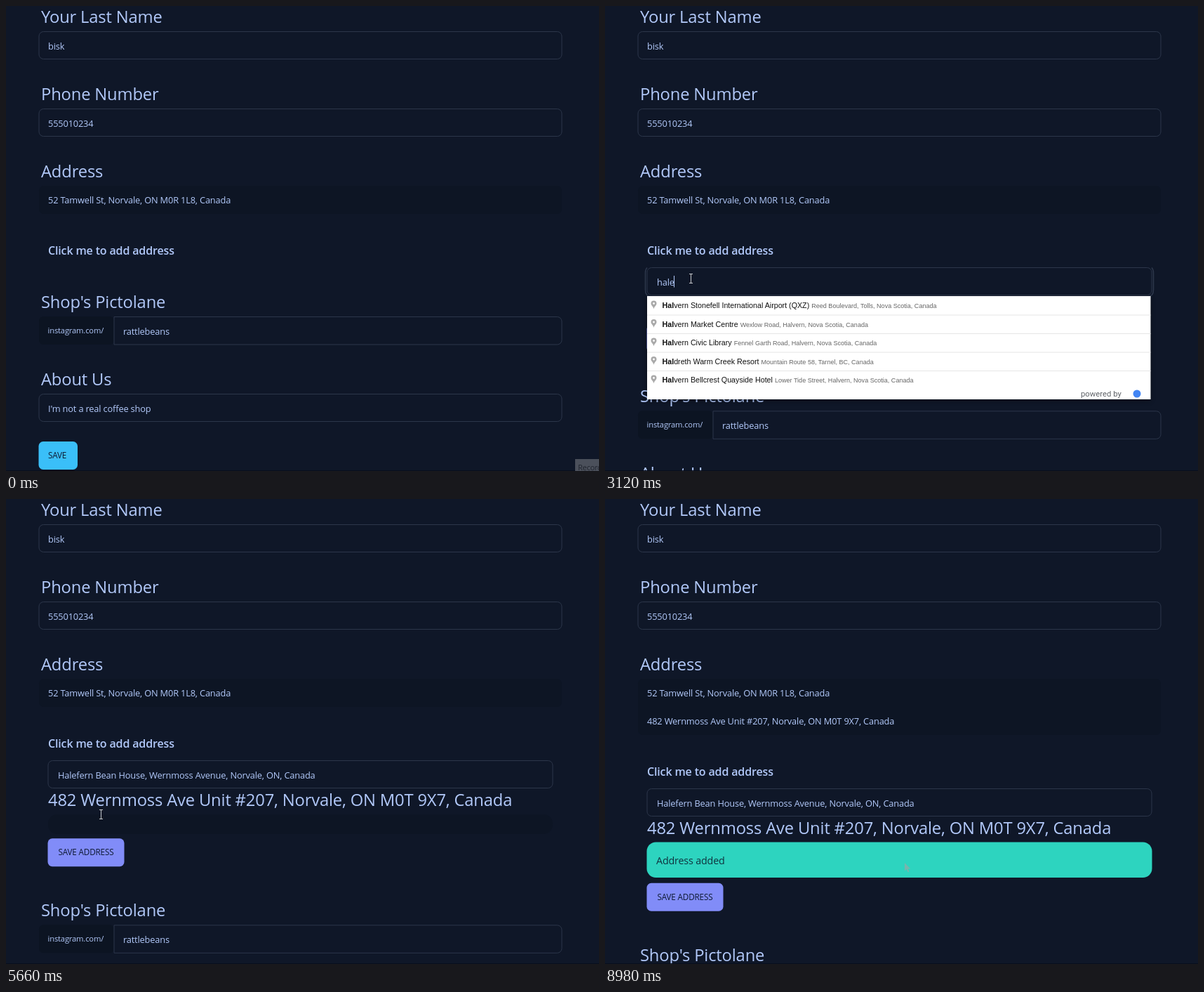
Recreate the animation shown at these times as an HTML page. Size 845 by 662 pixels, loop 9530 ms.

```html
<!DOCTYPE html>
<html lang="en">
<head>
<meta charset="utf-8">
<title>Adding an address</title>
<style>
  html, body { margin: 0; width: 100%; height: 100%; overflow: hidden; background: #0f1728; }
  svg { display: block; width: 845px; height: 662px; font-family: "Open Sans", "Noto Sans", sans-serif; letter-spacing: -.01em; }
  .list { font-family: "Liberation Sans", Arial, sans-serif; letter-spacing: 0; }
</style>
</head>
<body>
<svg id="stage" viewBox="0 0 845 662"></svg>
<script>
const LOOP = 9530;
const INK = '#b2c9fa', DARK = '#0e1a33', LINE = '#2c364a', SHADE = '#0c1422', FAINT = '#0d1524';
const stage = document.getElementById('stage');

// Key moments in ms
const OPEN = 880, FOCUS = 1500, LIST = 2690, PICK = 4520, FOUND = 4650, HOVER = 5930, SAVE = 6260, SAVED = 6390;
const KEYS = [2290, 2490, 2960, 3120];
const CARET_X = [74, 81.5, 88.5, 91.5, 98.5];
const CLICKS = [[OPEN, 122, 347], [FOCUS, 122, 388], [PICK, 135, 427], [SAVE, 121, 503]];

// Pointer waypoints: time, x, y
const PATH = [
  [70, 840, 655], [540, 122, 348], [950, 122, 348], [1230, 122.5, 388],
  [3990, 122.5, 388], [4310, 135.5, 428], [5590, 135.5, 428], [5660, 135.5, 449],
  [5990, 121, 502], [7310, 121, 502], [7450, 113, 430], [7700, 324, 470],
  [7980, 153, 508], [8180, 153, 508], [8400, 300, 408], [8650, 768, 490],
  [8800, 600, 629], [8980, 427, 518]
];

const OLD_ADDRESS = '52 Tamwell St, Norvale, ON M0R 1L8, Canada';
const NEW_ADDRESS = '482 Wernmoss Ave Unit #207, Norvale, ON M0T 9X7, Canada';
const SHOP = ['Halefern Bean House', 'Wernmoss Avenue, Norvale, ON, Canada'];

const PLACES = [
  ['Halvern Stonefell International Airport (QXZ)', 'Reed Boulevard, Tolls, Nova Scotia, Canada'],
  ['Halvern Market Centre', 'Wexlow Road, Halvern, Nova Scotia, Canada'],
  ['Halvern Civic Library', 'Fennel Garth Road, Halvern, Nova Scotia, Canada'],
  ['Haldreth Warm Creek Resort', 'Mountain Route 58, Tarnel, BC, Canada'],
  ['Halvern Bellcrest Quayside Hotel', 'Lower Tide Street, Halvern, Nova Scotia, Canada']
];
const HALE_PLACES = [
  SHOP,
  ['Halemont Garden Centre', 'Wexlow Road, Norvale, ON, Canada'],
  ['Halecombe Station', 'Tamwell Street, Norvale, ON, Canada'],
  ['Haleridge Community Hall', 'Orrin Road, Tarnel, BC, Canada'],
  ['Halestow Park', 'Lower Tide Street, Halvern, Nova Scotia, Canada']
];

const clamp = v => Math.min(1, Math.max(0, v));
const ease = v => { v = clamp(v); return v * v * (3 - 2 * v); };
const mix = (a, b, k) => a.map((v, i) => Math.round(v + (b[i] - v) * k));

const text = (x, y, str, size = 12.8, fill = INK, extra = '') =>
  `<text x="${x}" y="${y}" font-size="${size}" fill="${fill}" ${extra}>${str}</text>`;
const heading = (x, y, str) => text(x, y, str, 23.75);
const box = (x, y, w, h, r, fill, stroke = 'none') =>
  `<rect x="${x}" y="${y}" width="${w}" height="${h}" rx="${r}" fill="${fill}" stroke="${stroke}"/>`;
const shift = (dy, content) => `<g transform="translate(0 ${dy})">${content}</g>`;
const field = (y, label, value) =>
  heading(50, y, label) + box(47, y + 12.5, 745, 39, 6.5, 'none', LINE) + text(60, y + 38, value);

function lowerForm() {
  return heading(50, 430, "Shop's Pictolane") +
    box(47, 442, 107, 40, 6, SHADE) + text(59.5, 466, 'instagram.com/', 11.2) +
    `<path d="M154 442.5H785.5a6.5 6.5 0 0 1 6.5 6.5V475.5a6.5 6.5 0 0 1 -6.5 6.5H154Z" fill="none" stroke="${LINE}"/>` +
    text(167, 468, 'rattlebeans') +
    field(540, 'About Us', "I'm not a real coffee shop") +
    box(46.5, 620, 55.5, 40, 6.5, '#3abff8') +
    text(60, 643.5, 'SAVE', 11.7, DARK);
}

function searchField(t) {
  const focused = t >= FOCUS && t < PICK;
  const typed = KEYS.filter(k => t >= k).length;
  let out = focused
    ? `<path d="M60 372.5Q57.5 375 57.5 380V404Q57.5 413.5 66 413.5H773Q781.5 413.5 781.5 404V380Q781.5 375 779 372.5" fill="none" stroke="${LINE}" stroke-width="1.6"/>`
    : '';
  out += box(60, 372.5, 719, 39, 6.5, 'none', LINE);
  if (t >= PICK) out += text(74, 397.5, SHOP.join(', '));
  else if (typed) out += text(74, 397.5, 'hale'.slice(0, typed));
  else out += text(74, 397.5, 'Enter your coffee shop name', 12.8, '#8a92a5');
  const lastKey = typed ? KEYS[typed - 1] : FOCUS;
  if (focused && (t - lastKey) % 1060 < 530) out += box(CARET_X[typed] - .5, 384, 1, 16.5, 0, INK);
  return out;
}

function saveButton(t, y) {
  const hover = ease((t - HOVER) / 150) * (1 - ease((t - 6540) / 180));
  const scale = t >= SAVED && t < 6600 ? 1.01 : 1;
  const fill = `rgb(${mix([129, 140, 248], [58, 78, 240], hover)})`;
  return `<g transform="translate(114 ${y + 19.75}) scale(${scale})">` +
    box(-54.5, -20, 109, 40, 6.5, fill) +
    text(0, 4, 'SAVE ADDRESS', 11.7, DARK, 'text-anchor="middle"') + '</g>';
}

function addressPanel(t) {
  let out = text(60, 354, 'Click me to add address', 16.05, INK, 'font-weight="600"');
  if (t < OPEN) return out;
  out += searchField(t);
  if (t >= FOUND) out += heading(60, 437, NEW_ADDRESS);
  if (t >= SAVED) out += box(59.5, 448.5, 720, 50.5, 13, '#2dd4bf') + text(73, 479.5, 'Address added', 14.3, '#10333f');
  else out += box(60, t >= FOUND ? 449 : 419, 719, 28, 13, FAINT);
  return out + saveButton(t, t >= SAVED ? 507 : t >= FOUND ? 483.5 : 453.5);
}

function suggestions(t) {
  if (t < LIST || t >= PICK) return '';
  const bold = t < KEYS[3] ? 2 : t < 3260 ? 3 : 4;
  const rows = bold === 4 ? HALE_PLACES : bold === 3 ? PLACES : [...PLACES.slice(1), PLACES[0]];
  let out = `<rect x="60" y="413" width="717.5" height="147" fill="#fff" style="filter:drop-shadow(0 2px 3px #0006)"/>`;
  rows.forEach(([name, place], i) => {
    const y = 430 + i * 26.5;
    if (i) out += box(60, y - 17, 717.5, 1, 0, '#e6e6e6');
    out += `<path d="M69.5 ${y + 1.5}c-.6-4-4-5-4-8a4 4 0 0 1 8 0c0 3-3.4 4-4 8z" fill="#a9a9a9"/>` +
      `<circle cx="69.5" cy="${y - 6.5}" r="1.4" fill="#fff"/>` +
      text(81.5, y, `<tspan font-weight="700">${name.slice(0, bold)}</tspan>${name.slice(bold)}` +
        `<tspan dx="3" font-size="9.05" fill="#666">${place}</tspan>`, 10.7, '#111');
  });
  out += text(678, 556, 'powered by', 11.3, '#5f6368', 'font-family="Roboto, sans-serif"') +
    '<circle cx="758" cy="552" r="5.5" fill="#4285f4"/>';
  return `<g class="list">${out}</g>`;
}

function pointer(t) {
  if (t < PATH[0][0]) return '';
  const next = PATH.findIndex(p => p[0] > t);
  let [, x, y] = PATH[PATH.length - 1];
  if (next > 0) {
    const [t0, x0, y0] = PATH[next - 1], [t1, x1, y1] = PATH[next];
    const k = ease((t - t0) / (t1 - t0));
    x = x0 + (x1 - x0) * k;
    y = y0 + (y1 - y0) * k;
  }
  const beam = (t >= 1090 && t < 4200) || (t >= FOUND && t < 5800);
  if (beam) return `<path transform="translate(${x} ${y})" d="M-2.5 -6.5H2.5M0 -6.5V6.5M-2.5 6.5H2.5" fill="none" stroke="#c6c9cc"/>`;
  const [fill, edge] = t >= SAVE && t < 6730 ? ['#a8402f', '#1a1a1a'] : t >= 8900 ? ['#78b5ad', 'none'] : ['#f4f4f4', '#10141c'];
  return `<path transform="translate(${x} ${y})" d="M0 0V11.5L2.7 9L4.6 13.3L6.4 12.5L4.6 8.4H8.2Z" fill="${fill}" stroke="${edge}" stroke-width=".8"/>`;
}

function clickMark(t) {
  const hit = CLICKS.find(([start]) => t >= start && t < start + 70);
  return hit ? `<circle cx="${hit[1]}" cy="${hit[2]}" r="9.5" fill="#fff000" opacity=".48"/>` : '';
}

function scene(t) {
  const listDrop = t >= SAVED ? 40 : 0;
  let drop = t < OPEN ? 0 : 121 + 13.3 * ease((t - OPEN) / 200);
  if (t >= FOUND) drop += 30;
  if (t >= SAVED) drop += 63.5;
  return box(0, 0, 845, 662, 0, '#0f1728') +
    field(24, 'Your Last Name', 'bisk') +
    field(134, 'Phone Number', '555010234') +
    heading(50, 243.5, 'Address') +
    box(47, 256, 745, 40 + listDrop, 6.5, FAINT) +
    text(60, 281, OLD_ADDRESS) +
    (listDrop ? text(60, 321, NEW_ADDRESS) : '') +
    shift(drop, lowerForm()) +
    shift(listDrop, addressPanel(t)) +
    suggestions(t) +
    box(0, 661, 845, 1, 0, '#080e1c') +
    (t < 70 ? box(811, 645, 34, 17, 0, '#4b505b') + text(815, 660.5, 'Record', 10.8, '#20252f') : '') +
    clickMark(t) + pointer(t);
}

const start = performance.now();
function frame() {
  stage.innerHTML = scene((performance.now() - start) % LOOP);
  requestAnimationFrame(frame);
}
frame();
</script>
</body>
</html>
```
